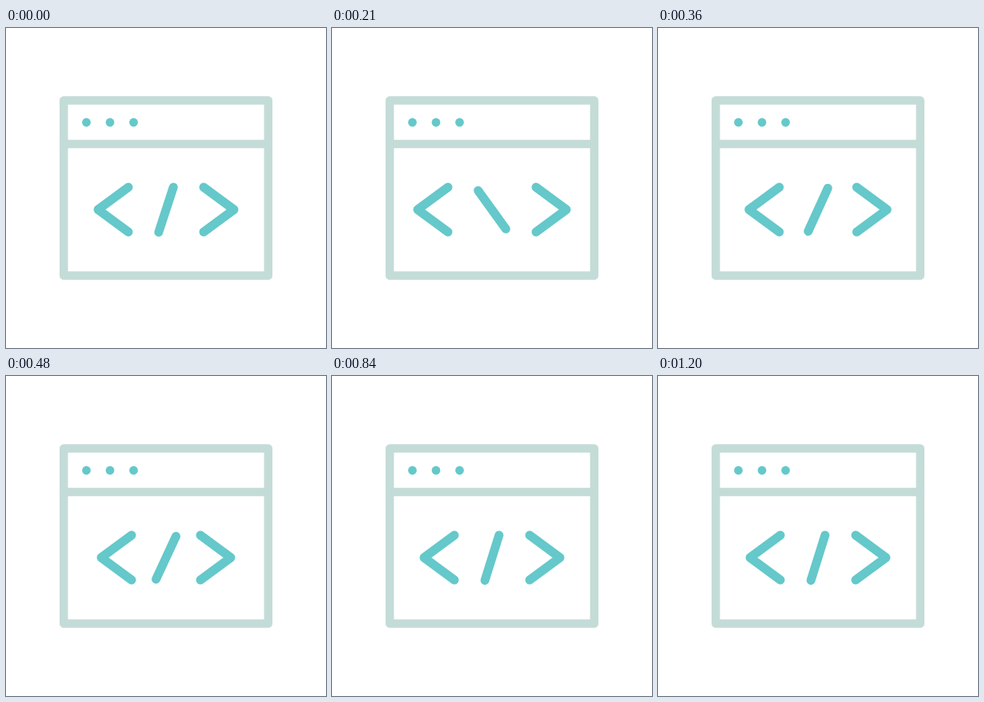
Write an HTML page with a canvas that moves like this. It is 400 px wide and 400 px high and loops after 1.23 s.

```html
<!DOCTYPE html>
<html lang="en">
<head>
<meta charset="utf-8">
<title>Code window</title>
<style>
  html, body { margin: 0; width: 100%; height: 100%; overflow: hidden; background: #fff; }
  canvas { display: block; }
</style>
</head>
<body>
<canvas id="stage" width="400" height="400"></canvas>
<script>
const ctx = document.getElementById('stage').getContext('2d');
const LOOP = 1230, STEP = 30;
const PALE = '#c4dcd7', TEAL = '#65c8ca';
const SPIN_END = 300;

// Horizontal shift of the brackets: [time, outward offset]
const SPREAD = [[0, 0], [210, 8], [480, -4], [720, 0], [LOOP, 0]];

function interpolate(keys, t) {
  const i = keys.findIndex(key => key[0] > t);
  const [t0, v0] = keys[i - 1], [t1, v1] = keys[i];
  return v0 + (v1 - v0) * (t - t0) / (t1 - t0);
}

// Half a turn at constant speed, then a decaying wobble, in degrees
function slashTurn(t) {
  if (t < SPIN_END) return 180 * t / SPIN_END;
  const s = (t - SPIN_END) / 1000;
  return 180 + 12 * Math.sin(11.2 * s) * Math.exp(-2.6 * s);
}

function polyline(points) {
  ctx.beginPath();
  points.forEach(([x, y]) => ctx.lineTo(x, y));
  ctx.stroke();
}

function drawWindow() {
  ctx.strokeStyle = PALE;
  ctx.lineWidth = 10.5;
  ctx.strokeRect(72.2, 90.4, 255.6, 219.2);
  polyline([[72.2, 145], [327.8, 145]]);
  ctx.fillStyle = TEAL;
  for (const x of [100.5, 130, 159.5]) {
    ctx.beginPath();
    ctx.arc(x, 118, 5.4, 0, 2 * Math.PI);
    ctx.fill();
  }
}

function drawCode(t) {
  ctx.strokeStyle = TEAL;
  ctx.lineWidth = 11;
  const spread = interpolate(SPREAD, t);
  for (const side of [-1, 1]) {
    const tip = 200 + side * (85 + spread);
    const end = tip - side * 38;
    polyline([[end, 199], [tip, 227], [end, 255]]);
  }
  const angle = (18.1 + slashTurn(t)) * Math.PI / 180;
  const dx = 29.6 * Math.sin(angle), dy = -29.6 * Math.cos(angle);
  polyline([[200 + dx, 227.2 + dy], [200 - dx, 227.2 - dy]]);
}

const start = performance.now();

function render() {
  const elapsed = Math.max(0, performance.now() - start) % LOOP;
  const t = Math.floor(elapsed / STEP) * STEP;
  ctx.fillStyle = '#fff';
  ctx.fillRect(0, 0, 400, 400);
  ctx.lineCap = ctx.lineJoin = 'round';
  drawWindow();
  drawCode(t);
  requestAnimationFrame(render);
}
render();
</script>
</body>
</html>
```
